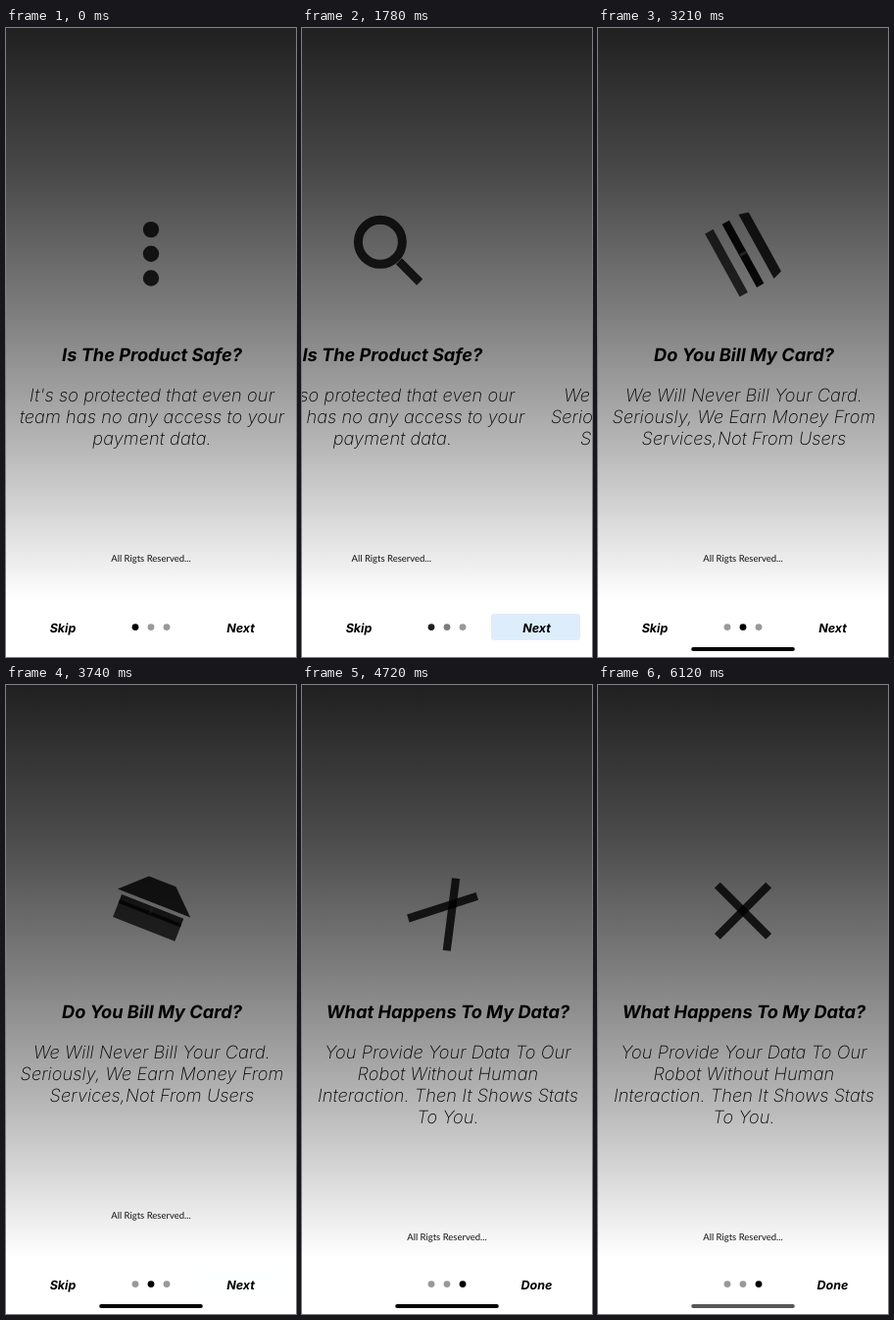
These frames come from a looping animation (296 by 640 pixels, 6160 ms). An HTML page:

```html
<!DOCTYPE html>
<html lang="en">
<head>
<meta charset="utf-8">
<title>Onboarding</title>
<style>
  html, body { margin: 0; width: 100%; height: 100%; overflow: hidden; background: #fff; }
  svg { display: block; width: 100vw; height: 100vh; }
  text {
    font-family: Inter, sans-serif; font-style: italic; font-optical-sizing: none;
    font-kerning: normal; text-rendering: geometricPrecision; text-anchor: middle;
  }
  .title { font-size: 18.2px; font-weight: 700; }
  .body { font-size: 18.2px; font-weight: 200; letter-spacing: .1px; }
  .foot { font: 400 9.5px Lato, sans-serif; fill: #111; }
  .button { font-size: 12.5px; font-weight: 700; }
</style>
</head>
<body>
<svg viewBox="0 0 296 640">
  <defs>
    <linearGradient id="sky" x2="0" y2="1">
      <stop offset="0" stop-color="#202020"/>
      <stop offset=".26" stop-color="#4a4a4a"/>
      <stop offset=".5" stop-color="#7e7e7e"/>
      <stop offset=".74" stop-color="#b9b9b9"/>
      <stop offset="1" stop-color="#fff"/>
    </linearGradient>
  </defs>
  <rect width="296" height="640" fill="#fff"/>
  <rect width="296" height="582" fill="url(#sky)"/>
  <g id="pages"></g>
  <rect id="press" x="193" y="596" width="91" height="27" rx="3" fill="#deedfb"/>
  <text id="skip" class="button" x="58" y="614.5">Skip</text>
  <text id="next" class="button" x="239.5" y="614.5">Next</text>
  <g id="dots"></g>
  <rect id="bar" x="95.2" y="630.1" width="105.6" height="3.8" rx="1.9"/>
</svg>
<script>
const LOOP = 6160, WIDTH = 296, SLIDE = 350, TAPS = [1650, 3838];
const UNIT = 98.67 / 48; // icons are drawn on a 48-unit grid
const $ = id => document.getElementById(id);
const clamp = v => Math.max(0, Math.min(1, v));
const mix = (a, b, k) => a + (b - a) * k;

const pages = [
  ['Is The Product Safe?', "It's so protected that even our", 'team has no any access to your', 'payment data.'],
  ['Do You Bill My Card?', 'We Will Never Bill Your Card.', 'Seriously, We Earn Money From', 'Services,Not From Users'],
  ['What Happens To My Data?', 'You Provide Your Data To Our', 'Robot Without Human', 'Interaction. Then It Shows Stats', 'To You.']
];
const label = (kind, x, y, s) => `<text class="${kind}" x="${x}" y="${y}">${s}</text>`;
$('pages').innerHTML = pages.map(([title, ...lines]) => `<g>
  <g class="icon" transform="translate(148 229.8)"></g>
  ${label('title', 149, 339, title)}
  ${lines.map((s, i) => label('body', 149, 379.5 + 22 * i, s)).join('')}
  ${label('foot', 148, 477 + 22 * lines.length, 'All Rigts Reserved...')}</g>`).join('');
$('dots').innerHTML = [132, 148, 164].map(x => `<circle cx="${x}" cy="609.6" r="3.42"/>`).join('');
const sheets = [...$('pages').children], dots = [...$('dots').children];
const icons = [...document.querySelectorAll('.icon')];

function bezier(x1, y1, x2, y2) {
  const at = (a, b, s) => 3 * (1 - s) ** 2 * s * a + 3 * (1 - s) * s * s * b + s ** 3;
  return x => {
    x = clamp(x);
    if (x === 0 || x === 1) return x;
    let lo = 0, hi = 1;
    for (let i = 0; i < 24; i++) {
      const s = (lo + hi) / 2;
      if (at(x1, x2, s) < x) lo = s; else hi = s;
    }
    return at(y1, y2, lo);
  };
}
const easeIn = bezier(.42, 0, 1, 1), ease = bezier(.4, 0, .2, 1);

const disc = (x, y, r) => `<circle cx="${x}" cy="${y}" r="${r}"/>`;
const box = (x, y, w, h, more = '') =>
  `<rect x="${x - w / 2}" y="${y - h / 2}" width="${w}" height="${h}" ${more}/>`;

// Three dots: top joins the rim, middle opens into the lens, bottom stretches into the handle.
function search(k) {
  const outer = mix(8.2, 27, k), inner = 18 * k, r = (outer + inner) / 2;
  const cx = -11.5 * k, cy = -12 * k;
  const hx = mix(0, 18.2, k), hy = mix(24.7, 18.2, k);
  return `<g opacity=".82">
    <circle cx="${cx}" cy="${cy}" r="${r}" fill="none" stroke="#000" stroke-width="${outer - inner}"/>
    ${disc(mix(0, -11.5, k), mix(-24.7, -34.5, k), mix(8.2, 4.3, k))}
    ${box(hx, hy, mix(16.4, 30, k), mix(16.4, 8.6, k), `rx="${8.2 * (1 - k)}" transform="rotate(45 ${hx} ${hy})"`)}</g>`;
}

// Bars turn half around; the first grows into a roof, the others into the walls.
function home(k) {
  const q = clamp((k - .63) / .42), half = mix(18, 15.5, q);
  const top = mix(8, -4.6, q), bottom = mix(12, 8.2, q);
  const roofTop = 18 * (1 - q), eave = mix(18, 20.3, q), peak = mix(-12, -18, q), sill = mix(-8, -1.5, q);
  return `<g transform="rotate(${180 * (1 - k)}) scale(${UNIT})">
    ${box(0, (top + bottom) / 2, half * 2, bottom - top, 'opacity=".74"')}
    ${box(0, 0, half * 2, mix(4, 5, q), `opacity="${mix(.96, .7, q)}"`)}
    ${box(0, 0, 1.4, 3.4, `fill="#333" opacity="${.7 * (1 - q)}"`)}
    <path opacity=".83" d="M${-roofTop} ${peak}H${roofTop}L${eave} ${sill}H${-eave}Z"/></g>`;
}

// Outer bars swing and meet in a cross while the middle one shrinks away.
function close(k) {
  const bar = (y, turn, size) =>
    `<g transform="rotate(${180 * k}) translate(0 ${y * (1 - k)}) rotate(${turn * k})">${box(0, 0, 36 * size, 4)}</g>`;
  return `<g transform="scale(${UNIT})" fill-opacity=".82">
    ${bar(-10, -45, 1)}${bar(0, 0, Math.max(0, 1 - 3.7 * k))}${bar(10, 45, 1)}</g>`;
}

function draw(t) {
  const page = TAPS.reduce((sum, tap) => sum + easeIn((t - tap) / SLIDE), 0);
  sheets.forEach((g, i) => {
    g.setAttribute('transform', `translate(${(i - page) * WIDTH} 0)`);
    g.style.display = Math.abs(i - page) < 1 ? '' : 'none';
  });
  dots.forEach((dot, i) => {
    const v = Math.round(153 * Math.min(1, Math.abs(page - i)));
    dot.setAttribute('fill', `rgb(${v},${v},${v})`);
  });

  icons[0].innerHTML = search(1 - (1 - ease(t / 1300)) ** 2);
  icons[1].innerHTML = home(ease((t - 1980) / 2900));
  icons[2].innerHTML = close(ease((t - 3800) / 2000));

  const last = page >= 1.5;
  $('skip').style.display = last ? 'none' : '';
  $('next').textContent = last ? 'Done' : 'Next';
  $('press').style.opacity = Math.max(...TAPS.map(tap =>
    Math.min(clamp((t - tap + 100) / 100), clamp((tap + 360 - t) / 100))));
  $('bar').style.opacity = Math.min(clamp((t - 1900) / 300), clamp(1 - (t - 5950) / 500));
}

const start = performance.now();
function tick() {
  draw((performance.now() - start) % LOOP);
  requestAnimationFrame(tick);
}
tick();
</script>
</body>
</html>
```
